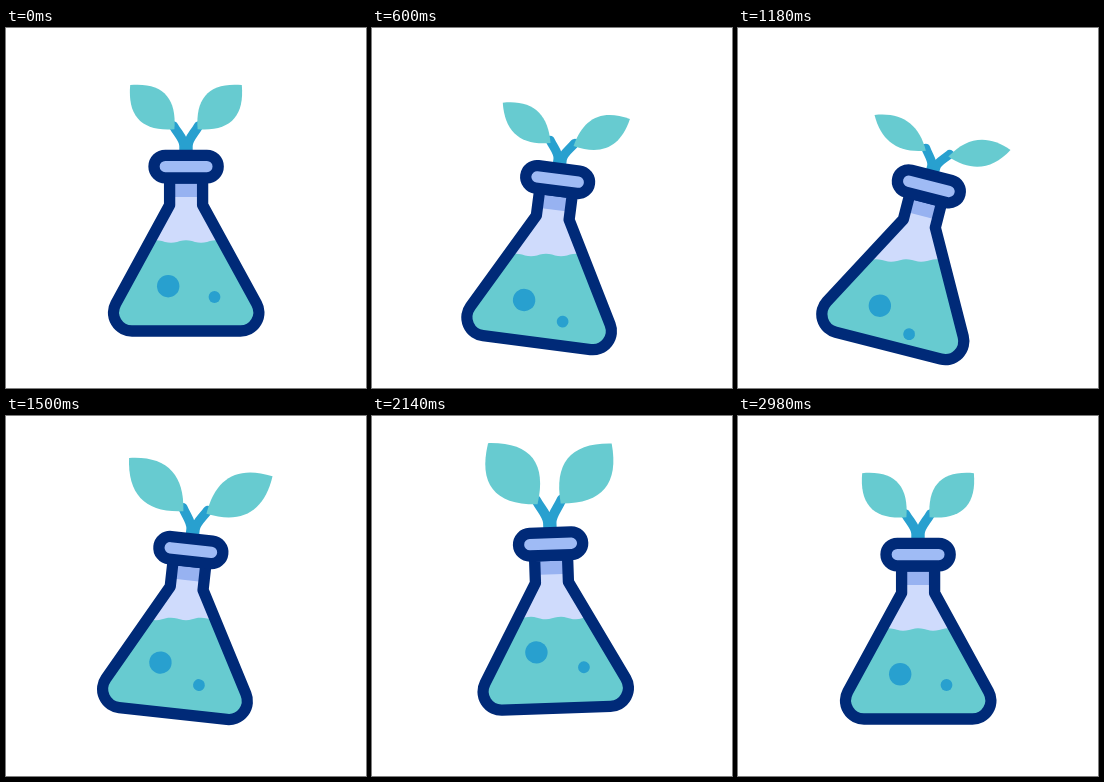
These frames come from a looping animation (360x360 px, 3 s). An HTML page:

```html
<!DOCTYPE html>
<html lang="en">
<head>
<meta charset="utf-8">
<title>Flask with sprout</title>
<style>
  html, body { margin: 0; width: 100%; height: 100%; overflow: hidden; background: #fff; }
  svg { display: block; width: 100vw; height: 100vh; }
  .navy { stroke: #002a78; stroke-width: 11.3; stroke-linejoin: round; }
  .teal { fill: #67cbd0; }
  .blue { fill: #28a0cf; }
  .stem { fill: none; stroke: #28a0cf; stroke-width: 9.4; stroke-linecap: round; }
</style>
</head>
<body>
<svg viewBox="0 0 360 360">
  <defs>
    <path id="body" d="M163.6 150V177L109.8 275.6A18.5 18.5 0 0 0 126 303H234.4A18.5 18.5 0 0 0 250.6 275.6L196.6 177V150Z"/>
    <path id="leaf" d="M0 0C24.5 -21 24.5 -42 0 -62.5C-24.5 -42 -24.5 -21 0 0Z"/>
    <clipPath id="inside"><use href="#body"/></clipPath>
  </defs>
  <g id="flask">
    <path id="stem" class="stem" d="M-2 4V-4C-2 -11 -8 -16 -12.5 -24M2 4V-4C2 -11 8 -16 12.5 -24"/>
    <use id="leafL" class="teal" href="#leaf"/>
    <use id="leafR" class="teal" href="#leaf"/>
    <g clip-path="url(#inside)">
      <rect x="90" y="140" width="180" height="180" fill="#cfdbfc"/>
      <rect x="160" y="140" width="40" height="29" fill="#97b2f1"/>
      <path id="liquid" class="teal"/>
      <circle id="big" class="blue" r="11.2"/>
      <circle id="small" class="blue" r="5.9"/>
    </g>
    <use class="navy" href="#body" fill="none"/>
    <rect class="navy" x="148" y="127.3" width="64.2" height="22.6" rx="11.3" fill="#9fbbf5"/>
  </g>
</svg>
<script>
const LOOP = 3000, PX = 180, PY = 182, NECK = 122;
const BEATS = [60, 1100, 1890, 2470, 2980];
const $ = id => document.getElementById(id);
const move = (id, value) => $(id).setAttribute('transform', value);

function smooth(t, from, to) {
  const u = Math.min(1, Math.max(0, (t - from) / (to - from)));
  return (1 - Math.cos(Math.PI * u)) / 2;
}

// Rest, then a dip, a hop, a landing, and back to rest; lag shifts the beats.
function swing(t, lag, dip, hop, land) {
  const poses = [0, dip, hop, land, 0];
  return BEATS.slice(1).reduce((sum, end, i) =>
    sum + (poses[i + 1] - poses[i]) * smooth(t - lag, BEATS[i], end), 0);
}

function wave(y, phase) {
  let d = 'M0 420';
  for (let x = 0; x <= 360; x += 3) {
    d += `L${x} ${(y - 1.3 * Math.cos((x - 180) * Math.PI / 15 + phase)).toFixed(2)}`;
  }
  return d + 'L360 420Z';
}

function leaf(id, side, droop, grow, stretch) {
  const x = 180 + side * 11.6, y = NECK - 20.7 * stretch;
  const wide = grow * (1 - 0.011 * droop);
  move(id, `translate(${x} ${y}) rotate(${side * (45 + droop)}) scale(${wide} ${grow})`);
}

function draw(t) {
  const tilt = swing(t, 20, 14.6, -3, 0);
  const lift = swing(t, -45, 21, -22, 0);
  const level = 213.5 + swing(t, -60, 1.5, -10, 6.5);
  const stretch = 1 + swing(t, 0, -0.18, 0.22, 0);
  const grow = 1 + 0.26 * (smooth(t, 1180, 1620) - smooth(t, 2120, 2960));

  move('flask', `translate(0 ${lift}) rotate(${tilt} ${PX} ${PY})`);
  move('stem', `translate(180 ${NECK}) scale(1 ${stretch})`);
  leaf('leafL', -1, swing(t, 30, 25, -15, 7), grow, stretch);
  leaf('leafR', 1, swing(t, 30, 25, -10, 13), grow, stretch);

  // The liquid surface stays horizontal while the glass tilts.
  move('liquid', `rotate(${-tilt} ${PX} ${PY})`);
  $('liquid').setAttribute('d', wave(level, 2 * Math.PI * t / LOOP));
  move('big', `translate(162.2 ${258.2 + swing(t, 30, 8.5, -20, 6)})`);
  move('small', `translate(${208.5 + swing(t, 30, -11, 1, 0)} ${269 + swing(t, 0, 18.5, -12, 3)})`);
}

const start = performance.now();
function tick() {
  draw((performance.now() - start) % LOOP);
  requestAnimationFrame(tick);
}
tick();
</script>
</body>
</html>
```
